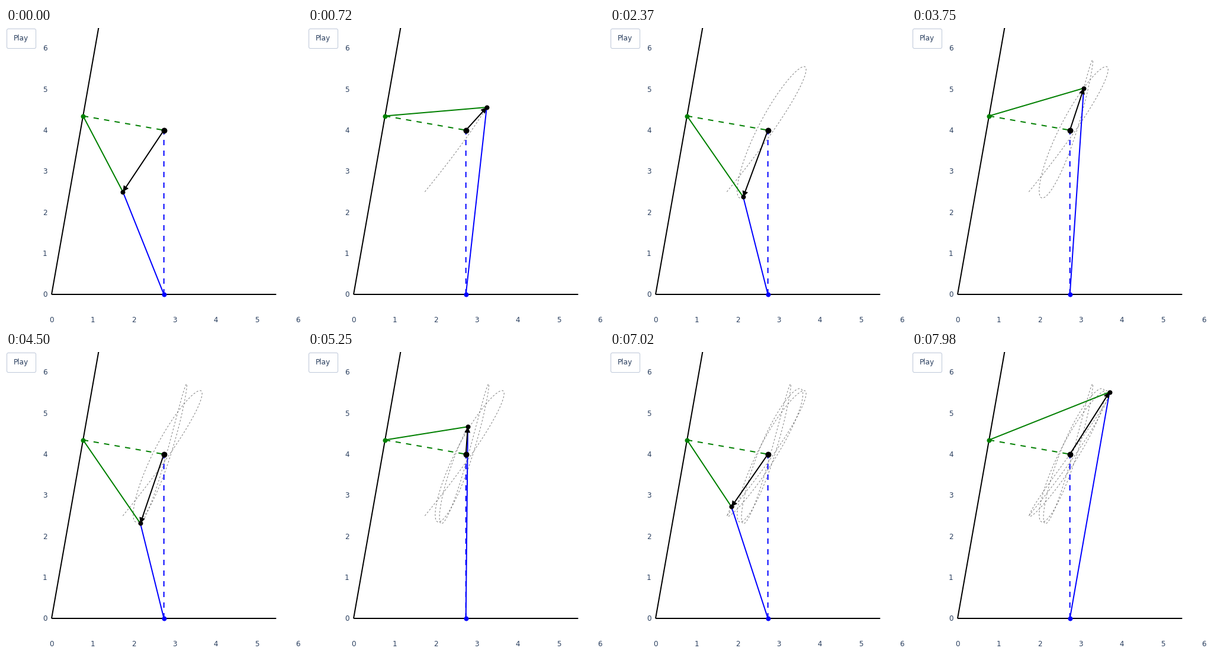
Write a matplotlib script that moves like this. It is 500 px wide and 500 px high and loops after 8 s.

```python
import numpy as np
import matplotlib.pyplot as plt
from matplotlib.animation import FuncAnimation
from matplotlib.patches import FancyBboxPatch, Polygon

SIZE = 500
PX = 0.72                # points per pixel at 100 dpi
UNIT = 416 / 6           # pixels per axis unit
ORIGIN = np.array([77.0, 450.0])
INK = "#2a3f5f"

plt.rcParams["font.family"] = "DejaVu Sans"
plt.rcParams["path.snap"] = False


def to_px(p):
    return ORIGIN + np.asarray(p) * [UNIT, -UNIT]


# Wedge geometry: the rest point lies 4 above the floor and 2 from the wall
wall = np.radians(80)
along = np.array([np.cos(wall), np.sin(wall)])
normal = np.array([np.sin(wall), -np.cos(wall)])
rest = np.array([(2 + 4 * np.cos(wall)) / np.sin(wall), 4.0])
floor_foot = np.array([rest[0], 0.0])
wall_foot = along * (rest @ along)

# Linear oscillator: one spring per surface, released at rest
K_FLOOR, K_WALL, DT, STEPS = 2.0, 3.0, 0.061, 267
stiffness = K_FLOOR * np.diag([0.0, 1.0]) + K_WALL * np.outer(normal, normal)
lam, modes = np.linalg.eigh(stiffness)
amp = modes.T @ np.array([-1.0, -1.5])
time = np.arange(STEPS)[:, None] * DT
path = to_px(rest + (amp * np.cos(np.sqrt(lam) * time)) @ modes.T)

rest_px, floor_px, wall_px = to_px(rest), to_px(floor_foot), to_px(wall_foot)

fig = plt.figure(figsize=(5, 5), dpi=100, facecolor="white")
ax = fig.add_axes([0, 0, 1, 1])
ax.set_xlim(0, SIZE)
ax.set_ylim(SIZE, 0)
ax.axis("off")


def line(pts, color, width=2, z=2, **kw):
    xs, ys = np.transpose(pts)
    return ax.plot(xs, ys, color=color, lw=width * PX, zorder=z,
                   solid_capstyle="butt", dash_capstyle="butt", **kw)[0]


def dot(p, color, diameter, z=5):
    return ax.plot([p[0]], [p[1]], "o", color=color, ms=diameter * PX,
                   mew=0, zorder=z)[0]


def label(x, y, s, ha="center"):
    ax.text(x, y, s, ha=ha, va="baseline", fontsize=12 * PX, color=INK)


# Axis labels and button
for n in range(7):
    label(ORIGIN[0] + n * UNIT, 497, str(n))
    label(69.5, ORIGIN[1] - n * UNIT + 4.2, str(n), "right")
ax.add_patch(FancyBboxPatch((1.5, 1.5), 49, 33, fc="white", ec="#bec8d9",
                            boxstyle="round,pad=0,rounding_size=2.5",
                            lw=PX, zorder=6))
ax.text(25.5, 21, "Play", ha="center", va="baseline", fontsize=12 * PX,
        color=INK, zorder=7)

# Fixed parts
line([ORIGIN, to_px([2 * rest[0], 0])], "black")
line([ORIGIN, to_px(along * 8)], "black")
dashes = (0, (4.5, 4.5))
line([floor_px, rest_px], "blue", ls=dashes)
line([wall_px, rest_px], "green", ls=dashes)
dot(floor_px, "blue", 8)
dot(wall_px, "green", 8)
dot(rest_px, "black", 10)

# Moving parts
trail = line(path[:1], "gray", 1, z=1.5, ls=(0, (3, 3)))
floor_spring = line([floor_px, path[0]], "blue", z=3)
wall_spring = line([wall_px, path[0]], "green", z=3)
shaft = line([rest_px, path[0]], "black", z=6)
head = ax.add_patch(Polygon(np.zeros((3, 2)), fc="black", lw=0, zorder=6))
mass = dot(path[0], "black", 8)


def draw(i):
    step = (2 * i + 1) // 3          # motion advances every 30 ms
    tip = path[step]
    trail.set_data(*path[:step + 1].T)
    floor_spring.set_data(*np.transpose([floor_px, tip]))
    wall_spring.set_data(*np.transpose([wall_px, tip]))
    mass.set_data([tip[0]], [tip[1]])

    u = (tip - rest_px) / max(np.hypot(*(tip - rest_px)), 1e-9)
    side = 5 * np.array([-u[1], u[0]])
    base = tip - 10 * u
    shaft.set_data(*np.transpose([rest_px, tip - 3 * u]))
    head.set_xy([base + side, base - side, tip])
    return trail, floor_spring, wall_spring, shaft, head, mass


anim = FuncAnimation(fig, draw, frames=400, interval=20, repeat=True,
                     repeat_delay=0, init_func=lambda: draw(0), blit=False)
plt.show()
```
